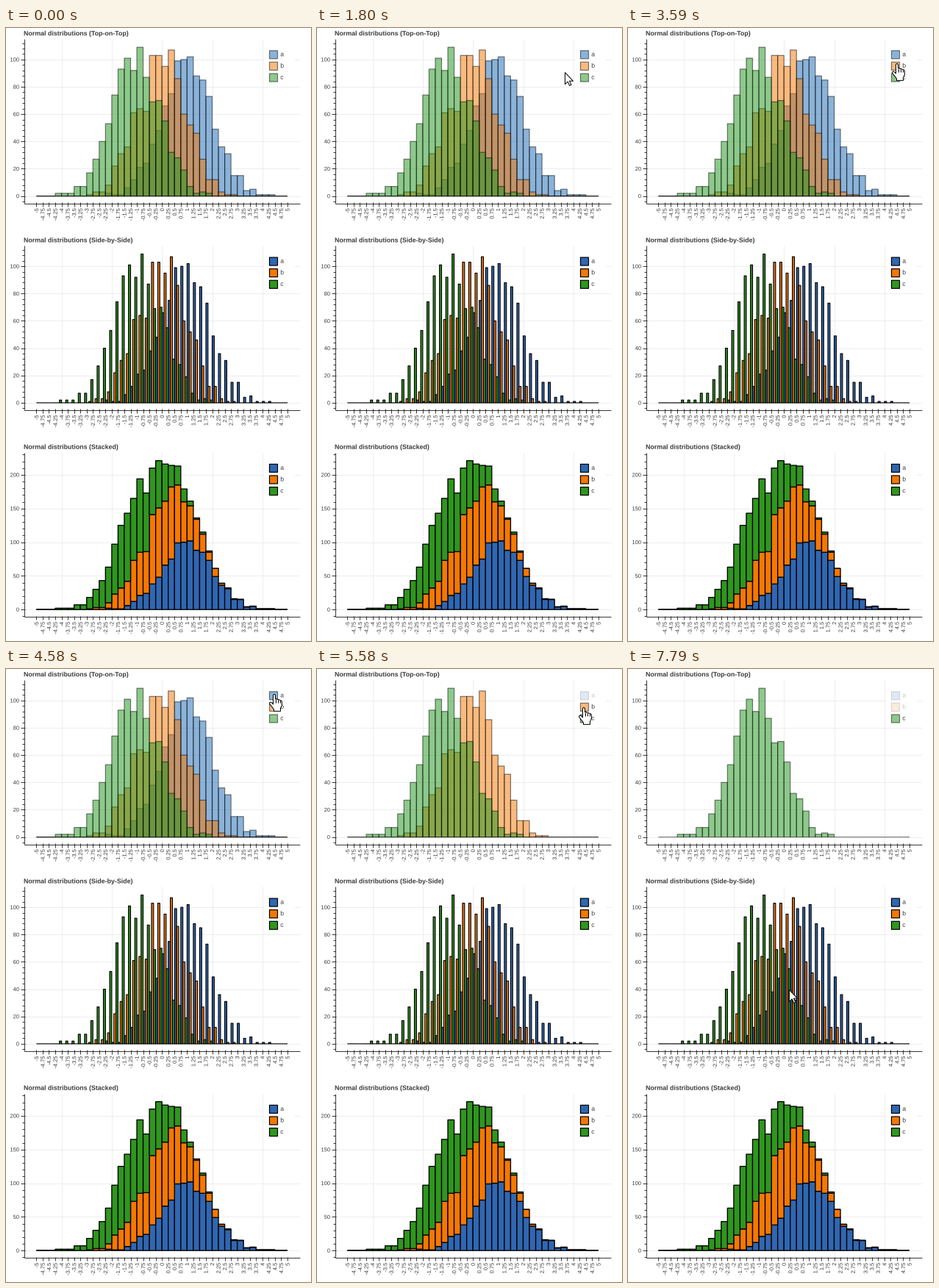
These frames come from a looping animation (415 px wide and 834 px high, 7.99 s). A matplotlib script:

```python
import numpy as np
import matplotlib.pyplot as plt
from matplotlib.animation import FuncAnimation
from matplotlib.collections import LineCollection, PolyCollection
from matplotlib.patches import PathPatch, Polygon, Rectangle
from matplotlib.path import Path
from matplotlib.textpath import TextPath

W, H = 415, 834
PX = 0.72                       # points per pixel at 100 dpi
LOOP, STEP = 7990, 34
X0, BIN = 41.4, 8.54            # left edge of the bins, bin width
LEFT, RIGHT, TOP, BOTTOM, ZERO = 24.5, 400, 15, 238.5, 228.6
PITCH = 281.3                   # distance between panels
LEGEND_Y, LEGEND_STEP = 35.8, 15.6

A = [2, 1, 1, 6, 12, 21, 24, 38, 48, 66, 75, 99, 100, 102, 88, 85, 73,
     49, 36, 31, 15, 15, 4, 5, 1, 1, 1]
B = [1, 3, 3, 8, 22, 31, 36, 61, 64, 62, 103, 103, 95, 107, 86, 60, 52,
     46, 27, 12, 12, 3, 1, 1]
C = [2, 2, 2, 7, 7, 17, 27, 40, 53, 74, 93, 101, 92, 109, 87, 69, 70,
     55, 32, 28, 19, 7, 2, 3, 2]


def padded(first, values):
    counts = np.zeros(40)
    counts[first:first + len(values)] = values
    return counts


SERIES = [padded(11, A), padded(8, B), padded(3, C)]
SOLID = ["#3067b2", "#f57800", "#2f961e"]
SOFT = ["#1868b4", "#f57600", "#1c9418"]

fig = plt.figure(figsize=(W / 100, H / 100), dpi=100, facecolor="white")
ax = fig.add_axes([0, 0, 1, 1])
ax.set_xlim(0, W)
ax.set_ylim(H, 0)
ax.axis("off")

glyphs = []


def write(s, x, y, size, right=False, vertical=False, bold=False):
    font = dict(family="Liberation Sans", weight="bold" if bold else "normal")
    path = TextPath((0, 0), s, size=size, prop=font)
    u, v = path.vertices.T
    if right:
        u = u - path.get_extents().x1
    xy = (x - v, y - u) if vertical else (x + u, y - v)
    glyphs.append(Path(np.column_stack(xy), path.codes))


def bars(x, width, low, high, color, lw, alpha=1):
    x, low, high = np.broadcast_arrays(x, low, high)
    corners = np.stack([np.column_stack(p) for p in (
        (x, low), (x, high), (x + width, high), (x + width, low))], axis=1)
    art = PolyCollection(corners, facecolor=color, edgecolor="black",
                         linewidth=lw * PX, alpha=alpha, zorder=2)
    art.set_snap(False)
    ax.add_collection(art, autolim=False)
    return art


def lines(segments, color, lw, z):
    art = LineCollection(segments, colors=color, linewidths=lw * PX, zorder=z)
    ax.add_collection(art, autolim=False)
    return art


def panel(row, title, unit, minor, count, colors, alpha):
    """Title, grid, axes, ticks and legend of one chart."""
    dy = row * PITCH
    zero, top, bottom = ZERO + dy, TOP + dy, BOTTOM + dy
    write(title, 24, 10.2 + dy, 8.85, bold=True)

    grid = [[(X0 + BIN * k, top), (X0 + BIN * k, bottom)]
            for k in (4, 12, 20, 28, 36)]
    axes = [[(LEFT, top), (LEFT, bottom)], [(LEFT, bottom), (RIGHT, bottom)]]
    for k in range(-1, count):
        y = zero - k * minor * unit
        if k % 5:
            axes.append([(LEFT - 3, y), (LEFT, y)])
        else:
            axes.append([(LEFT - 4.2, y), (LEFT + 1.5, y)])
            grid.append([(LEFT, y), (RIGHT, y)])
            write(str(k * minor), 17.7, y + 2.6, 7.5, right=True)
    for k in range(41):
        x = X0 + BIN * k
        axes.append([(x, bottom - 1.5), (x, bottom + 4)])
        write(f"{k / 4 - 5:g}", x + 2.6, bottom + 7, 7.5,
              right=True, vertical=True)
    lines(grid, "#ebebeb", 0.9, 0)
    lines(axes, "#222222", 0.9, 3)

    ax.add_patch(Rectangle((351, 22 + dy), 42, 58, fc="white", lw=0, zorder=1))
    for k, name in enumerate("abc"):
        y = LEGEND_Y + LEGEND_STEP * k + dy
        bars([358.0], 11, y - 5.5, y + 5.5, colors[k], 1.2, alpha)
        write(name, 373.3, y + 2.6, 8.6)
    return zero


edges = X0 + BIN * np.arange(40)

unit = 1.857
zero = panel(0, "Normal distributions (Top-on-Top)", unit, 4, 29, SOFT, 0.5)
layers = [bars(edges, BIN, zero, zero - unit * n, c, 1.2, 0.5)
          for n, c in zip(SERIES, SOFT)]

zero = panel(1, "Normal distributions (Side-by-Side)", unit, 4, 29, SOLID, 1)
for k in range(3):
    bars(edges + k * BIN / 3, BIN / 3, zero, zero - unit * SERIES[k],
         SOLID[k], 1.15)

unit = 0.9165
zero = panel(2, "Normal distributions (Stacked)", unit, 10, 24, SOLID, 1)
base = np.zeros(40)
for n, c in zip(SERIES, SOLID):
    bars(edges, BIN, zero - unit * base, zero - unit * (base + n), c, 1.35)
    base = base + n

ax.add_patch(PathPatch(Path.make_compound_path(*glyphs),
                       fc="#3c3c3c", lw=0, zorder=4))

# White veils that fade the legend entries of hidden series
veils = [ax.add_patch(Rectangle((356.5, LEGEND_Y + LEGEND_STEP * k - 7), 27.5,
                                14, fc="white", alpha=0.72, lw=0, zorder=5))
         for k in range(2)]
HIDE_AT = (5190, 6190)

ARROW = np.array([(.5, .6), (.5, 16.5), (4.2, 13), (6.6, 18.4), (8.9, 17.4),
                  (6.6, 12.1), (11.5, 12.1)])
HAND = np.array([(5.5, 2), (6, .8), (7, .5), (8, .8), (8.5, 2), (8.5, 6.6),
                 (10.5, 6.6), (11.5, 7.6), (13.5, 7.6), (14.5, 8.7),
                 (16.3, 8.8), (17.4, 10.2), (17.4, 15.5), (15.5, 19.5),
                 (15.5, 23.4), (6.5, 23.4), (6.5, 21), (3.5, 17), (.6, 13.2),
                 (.8, 11.6), (2.4, 11.2), (4, 12.2), (5.5, 14)])
KNUCKLES = np.array([[(8.5, 6.6), (8.5, 11.5)], [(11.5, 7.6), (11.5, 11.5)],
                     [(14.5, 8.7), (14.5, 11.5)]])

MOVES = [
    (810, ARROW, 312, 169), (1010, ARROW, 275, 158), (1200, ARROW, 237, 145),
    (1390, ARROW, 262, 109), (1610, ARROW, 298, 81), (1800, ARROW, 337, 60),
    (2000, HAND, 347, 46), (2190, HAND, 356, 37), (2390, HAND, 357, 36),
    (3200, HAND, 359, 44), (3390, HAND, 359, 46), (3590, HAND, 359, 48),
    (3780, HAND, 357, 51), (4190, HAND, 359, 37), (4390, HAND, 359, 36),
    (4580, HAND, 358, 34), (5190, HAND, 355, 43), (5390, HAND, 354, 48),
    (5580, HAND, 356, 52), (7200, ARROW, 295, 202), (7400, ARROW, 249, 341),
    (7600, ARROW, 219, 443), (7790, ARROW, 219, 436),
]

pointer = ax.add_patch(Polygon(ARROW, closed=True, fc="white", ec="black",
                               lw=PX, joinstyle="round", zorder=6))
knuckles = lines(KNUCKLES, "black", 1, 7)


def update(i):
    t = (i + 1) * STEP - 1
    for layer, veil, start in zip(layers, veils, HIDE_AT):
        layer.set_visible(t < start)
        veil.set_visible(t >= start)

    past = [m for m in MOVES if m[0] <= t]
    pointer.set_visible(bool(past))
    knuckles.set_visible(bool(past) and past[-1][1] is HAND)
    if past:
        _, shape, x, y = past[-1]
        pointer.set_xy(shape + (x, y))
        knuckles.set_segments(KNUCKLES + (x, y))
    return [*layers, *veils, pointer, knuckles]


anim = FuncAnimation(fig, update, frames=LOOP // STEP, interval=STEP,
                     repeat=True, repeat_delay=0, blit=False)
plt.show()
```
